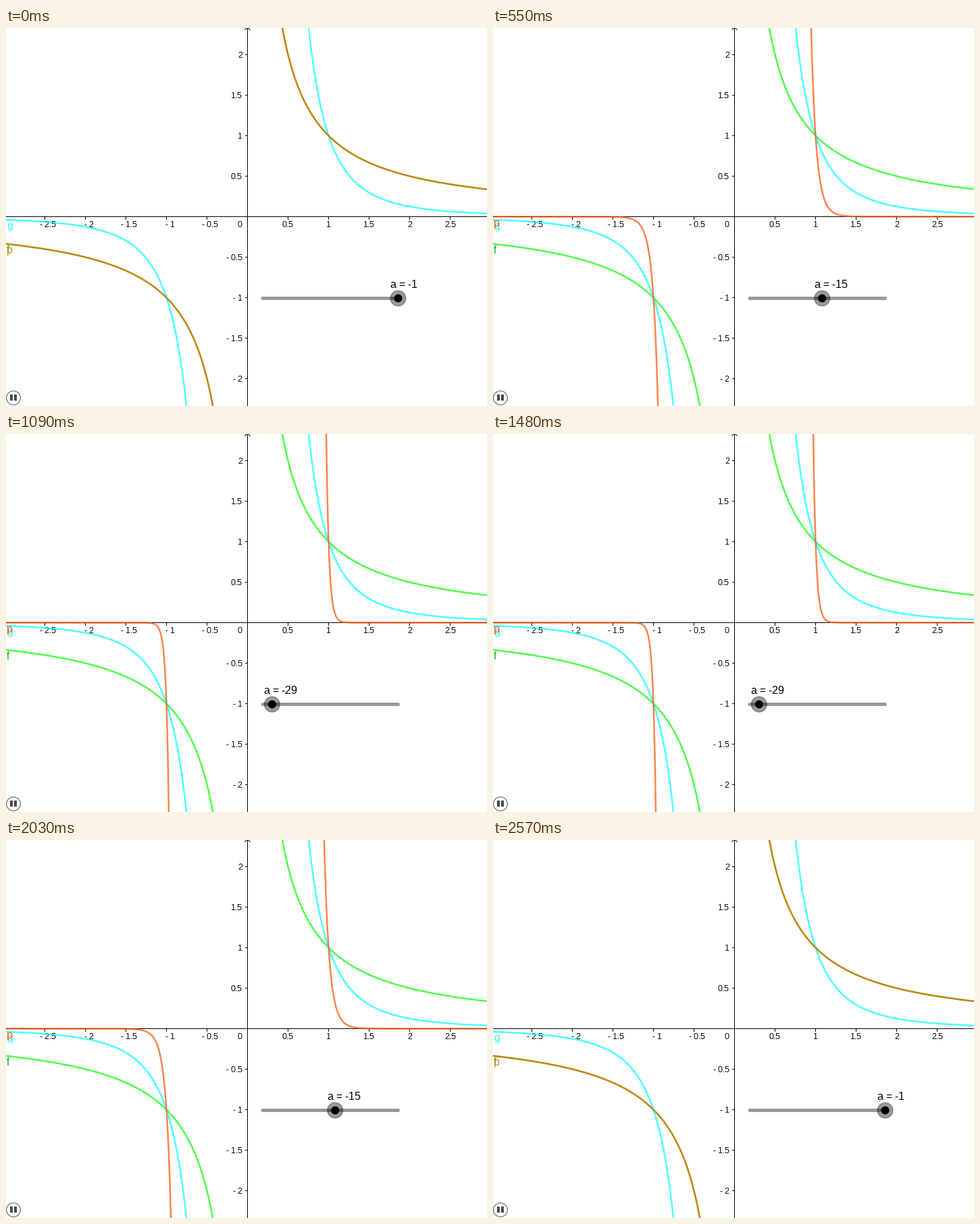
These frames come from a looping animation (712x560 px, 2.65 s). A matplotlib script:

```python
import numpy as np
import matplotlib.pyplot as plt
from matplotlib.animation import FuncAnimation
from matplotlib.patches import Circle, Rectangle

W, H, DPI = 712, 560, 64
PT = 72 / DPI                     # points per pixel
OX, OY, UNIT = 357.5, 279.5, 120  # origin and scale of the graph
LOOP, TICK = 2650, 10             # ms
GREEN, CYAN, ORANGE = (0, 1, 0), (0, 1, 1), (1, 80 / 255, 0)
MIXED = {-1: "#c98617", -3: "#c9864d"}  # name colour where p covers f or g

# Full hinting on whole pixels, as desktop user interfaces draw text.
plt.rcParams.update({"font.family": "Liberation Sans",
                     "text.hinting": "native", "text.hinting_factor": 1})

fig = plt.figure(figsize=(W / DPI, H / DPI), dpi=DPI, facecolor="white")
ax = fig.add_axes([0, 0, 1, 1])
ax.set_xlim(0, W)
ax.set_ylim(H, 0)
ax.axis("off")


def line(xs, ys, width, color, z, cap="butt", alpha=1):
    return ax.plot(xs, ys, lw=width * PT, color=color, zorder=z, alpha=alpha,
                   solid_capstyle=cap, snap=False)[0]


def text(x, y, s, size, color="black", z=1, ha="left"):
    return ax.text(x, y, s, fontsize=size * PT, color=color, zorder=z,
                   ha=ha, va="baseline")


def power_curve(a):
    """Both branches of x**a in pixels, split by a gap."""
    x = np.geomspace(3 ** (1 / a), 3, 300)
    y = x ** a
    xs = np.concatenate([-x[::-1], [np.nan], x])
    ys = np.concatenate([-y[::-1], [np.nan], y])
    return OX + UNIT * xs, OY - UNIT * ys


def label_y(a):
    """Baseline of a curve's name, just below its left end."""
    return OY + UNIT * (OX / UNIT) ** a + 14.2


def number(v):
    return f"- {-v:g}" if v < 0 else f"{v:g}"


def draw_axes():
    line([0, W], [OY, OY], 1, "black", 1)
    line([OX, OX], [0, H], 1, "black", 1)
    line([OX - 4, OX, OX + 4], [3, -1, 3], 1, "black", 1)
    for v in np.arange(-2.5, 3, 0.5):
        if v == 0:
            continue
        x, y = OX + UNIT * v, OY - UNIT * v
        line([x, x], [OY, OY + 4.5], 1, "black", 1)
        text(x + (5 if v < 0 else 0), 295, number(v), 12, ha="center")
        if abs(v) < 2.5:
            line([OX - 3.5, OX], [y, y], 1, "black", 1)
            text(350, y + 4.5, number(v), 12, ha="right")
    text(350, 295, "0", 12, ha="right")


def draw_pause_button():
    ax.add_patch(Circle((11, 548), 10.3, fc="white", ec="#808080",
                        lw=1.4 * PT, zorder=8))
    for x in (6, 12):
        ax.add_patch(Rectangle((x, 543), 4, 9, fc="#4a4a4a", lw=0, zorder=9))


draw_axes()
draw_pause_button()

line(*power_curve(-1), 2.5, GREEN, 2, alpha=0.7)
line(*power_curve(-3), 2.5, CYAN, 3, alpha=0.7)
text(1, label_y(-1), "f", 16, "#0fae0f", 5)
text(1, label_y(-3), "g", 16, "#26ffff", 5)
curve = line([], [], 2.5, ORANGE, 4, alpha=0.7)
name = text(1, 0, "p", 16, ORANGE, 6)

line([380, 580.5], [400.5, 400.5], 5, "#999999", 6, cap="round")
knob = [
    ax.add_patch(Circle((0, 400.5), 11.5, fc=(0, 0, 0, 0.4),
                        ec=(0, 0, 0, 0.4), lw=PT, zorder=7)),
    ax.add_patch(Circle((0, 400.5), 6, fc="black", lw=0, zorder=8)),
]
value = text(0, 385, "", 16, z=8)

SHORT = {5, 7, 10, 17, 22, 26, 29}
ENDS = np.cumsum([70 if k in SHORT else 80 for k in range(34)])


def update(i):
    # The exponent falls by 2 per step, rests at -31, then climbs back.
    k = int(np.searchsorted(ENDS, i * TICK, side="right"))
    a = -1 - 2 * min(k, 15, 33 - k)

    curve.set_data(*power_curve(a))
    name.set_y(label_y(a))
    name.set_color(MIXED.get(a, ORANGE))

    x = 580.5 + (a + 1) * 20 / 3
    for c in knob:
        c.center = (x, 400.5)
    value.set_x(x - 11.4)
    value.set_text(f"a = {a}")
    return [curve, name, value, *knob]


anim = FuncAnimation(fig, update, frames=LOOP // TICK, interval=TICK,
                     repeat=True, repeat_delay=0, blit=False)
plt.show()
```
